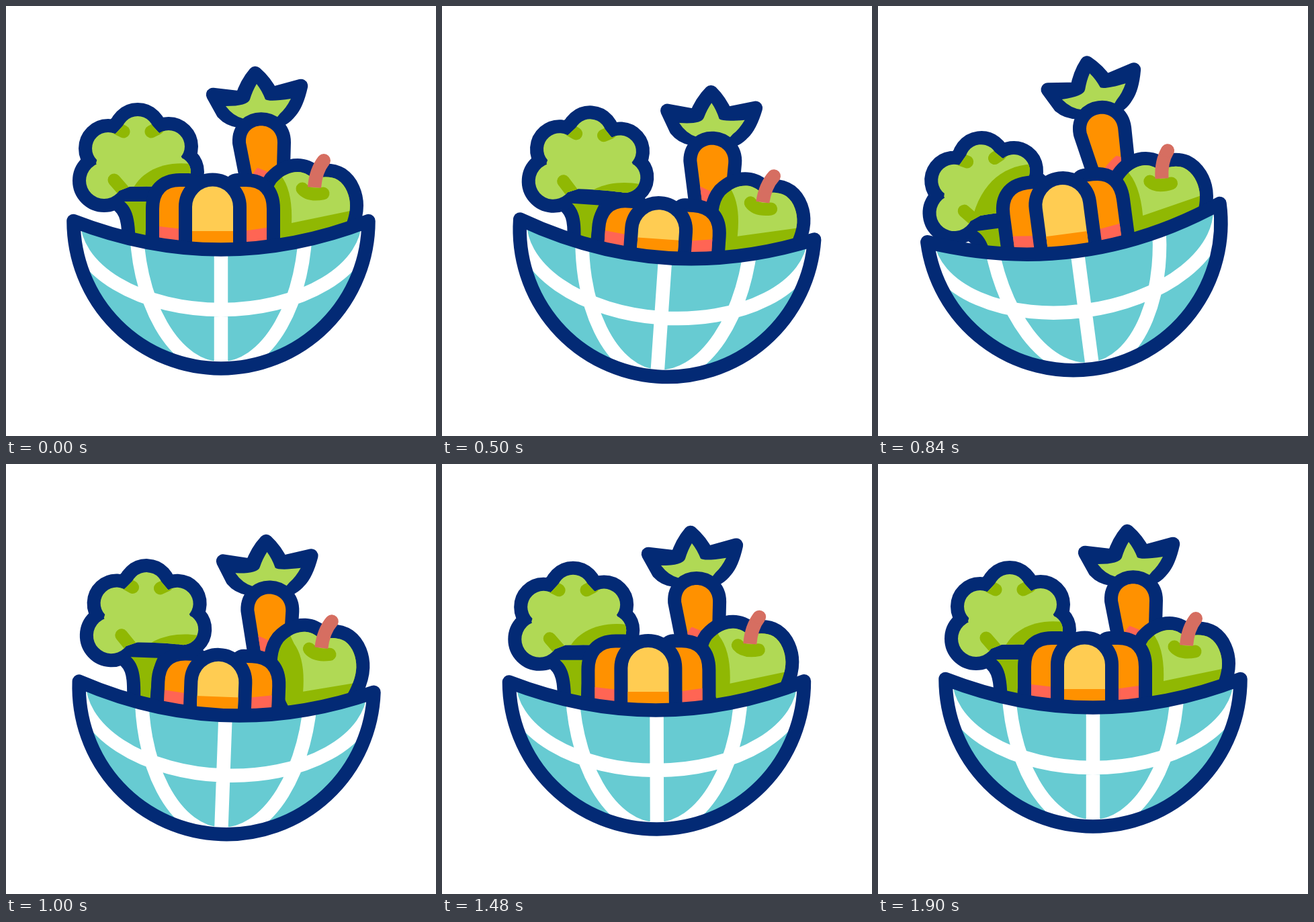
Recreate the animation shown at these times as an HTML page with a canvas. Size 640 by 640 pixels, loop 2.2 s.

```html
<!DOCTYPE html>
<html lang="en">
<head>
<meta charset="utf-8">
<title>Rocking bowl of vegetables</title>
<style>
  html, body { margin: 0; width: 100%; height: 100%; overflow: hidden; background: #fff; }
  canvas { display: block; width: 640px; height: 640px; }
</style>
</head>
<body>
<canvas id="stage" width="640" height="640"></canvas>
<script>
const ctx = document.getElementById('stage').getContext('2d');
const LOOP = 2200, BEAT = 240, LINE = 20.5;
const NAVY = '#032a75', TEAL = '#67cbd2', LIGHT = '#b0d955', DARK = '#90b803',
      ORANGE = '#ff9100', YELLOW = '#ffcc52', RED = '#ff6554', STEM = '#d66e61';

// Cosine-eased swing through values one beat apart.
function swing(t, start, values) {
  const p = (t - start) / BEAT;
  if (p <= 0) return values[0];
  const i = Math.floor(p);
  if (i >= values.length - 1) return values[values.length - 1];
  const k = (1 - Math.cos(Math.PI * (p - i))) / 2;
  return values[i] + (values[i + 1] - values[i]) * k;
}

function fill(path, color) {
  ctx.fillStyle = color;
  ctx.fill(path);
}

function stroke(path, color, width, cap = 'round') {
  ctx.strokeStyle = color;
  ctx.lineWidth = width;
  ctx.lineCap = cap;
  ctx.lineJoin = 'round';
  ctx.stroke(path);
}

// Navy border lying outside the shape.
function border(path) {
  fill(path, NAVY);
  stroke(path, NAVY, LINE * 2 - 1);
}

function inside(path, draw) {
  ctx.save();
  ctx.clip(path);
  draw();
  ctx.restore();
}

function shifted(dx, dy, draw) {
  ctx.save();
  ctx.translate(dx, dy);
  draw();
  ctx.restore();
}

const bowl = new Path2D('M100.5 320 A219.5 219.5 0 0 0 539.5 320 Q320 405 100.5 320 Z');
const grid = new Path2D();
grid.moveTo(320, 330);
grid.lineTo(320, 545);
grid.moveTo(539.5, 320);
grid.ellipse(320, 320, 219.5, 132, 0, 0, Math.PI);
grid.moveTo(446, 320);
grid.ellipse(320, 320, 126, 219.5, 0, 0, Math.PI);

const crown = new Path2D('M308 132 L351 137 Q358 115 371 100 Q386 113 395 131 L439 119 ' +
  'Q433 146 423 157 Q413 170 400 171 L347 171 Q332 169 323 159 Z');
const leaves = new Path2D('M327 149 Q360 149 363 139 Q367 126 373 116 Q381 126 386 139 ' +
  'Q392 143 424 138 Q417 152 408 160 L400 170 L354 168 Q338 164 327 149 Z');
const carrot = new Path2D('M357 203 C355 170 404 170 404 203 L403 240 L400 300 L376 300 Z');

const canopy = new Path2D('M134 234 L140 212 L165 188 L176 176 L216 176 L227 188 L250 205 L263 228 ' +
  'L265 262 Q254 271 236 269 Q208 268 184 269 L171 274 L155 280 Z');
for (const [x, y, r] of [[146, 260, 27], [152, 212, 24], [196, 188, 24], [242, 209, 24], [252, 247, 23]]) {
  const lobe = new Path2D();
  lobe.arc(x, y, r, 0, Math.PI * 2);
  canopy.addPath(lobe);
}
const trunk = new Path2D('M176 291 L216 291 C209 305 207 330 207 385 L193 385 C193 330 193 306 176 291 Z');
const dimples = new Path2D('M165 182 L175 187 M226 182 L216 187 M161 259 L175 275');

const apple = new Path2D('M402 263 C412 252 423 247 434 247 C446 247 452 254 459 257 ' +
  'C470 254 484 253 494 259 C506 267 512 283 512 297 C512 320 498 345 480 368 L420 368 ' +
  'C400 345 384 288 402 263 Z');
const sheen = new Path2D('M395 225 L409 252 Q427 275 425 323 L532 301 L532 225 Z');
const dent = new Path2D('M441 272 Q450 283 472 279');
const stalk = new Path2D('M459 270 Q461 245 473 230');
const stalkTip = new Path2D('M473 230 l.01 -.01');

const middle = new Path2D('M277 420 L277 299 A30.5 30.5 0 0 1 338 299 L338 420 Z');
const sides = [
  new Path2D('M228 420 L228 302 Q228 269 259 269 L272 269 L272 420 Z'),
  new Path2D('M388 420 L388 302 Q388 269 357 269 L344 269 L344 420 Z')
];
const sideShade = new Path2D('M220 327 L270 333 L346 336 L396 329 L396 450 L220 450 Z');
const middleShade = new Path2D('M270 335 L345 335 L345 450 L270 450 Z');

function drawCarrot(s) {
  fill(crown, NAVY);
  stroke(crown, NAVY, LINE);
  fill(leaves, LIGHT);
  border(carrot);
  fill(carrot, ORANGE);
  // The red tip lies below two edges that move against each other.
  const a = 235 - 5 * s, b = 215 + 16 * s;
  const slope = new Path2D(`M350 ${a - 4} L410 ${a + 20} L410 320 L350 320 Z`);
  const arc = new Path2D(`M355 ${b + 57} Q372 ${b + 17} 408 ${b} L408 320 L355 320 Z`);
  inside(carrot, () => inside(slope, () => fill(arc, RED)));
}

function drawBroccoli(s) {
  border(trunk);
  border(canopy);
  fill(trunk, DARK);
  fill(canopy, LIGHT);
  const y = 24 * s;
  const shade = new Path2D(`M${187 - 13 * s} 276 C${199 - 5 * s} ${247 - y} ` +
    `235 ${228 - y} 282 ${236 - y} L290 295 L187 295 Z`);
  inside(canopy, () => {
    fill(shade, DARK);
    stroke(dimples, DARK, 19);
  });
}

// Shades of the apple and pumpkin stay level with the bowl while the fruit slides.
function drawApple(slide) {
  border(apple);
  fill(apple, DARK);
  inside(apple, () => {
    shifted(-0.7 * slide, -slide, () => fill(sheen, LIGHT));
    stroke(dent, DARK, 19);
  });
  stroke(stalk, STEM, 20, 'butt');
  stroke(stalkTip, STEM, 20);
}

function drawPumpkin(slide) {
  const segment = (path, color, shade, shadeColor) => {
    fill(path, color);
    inside(path, () => shifted(0, -slide, () => fill(shade, shadeColor)));
  };
  for (const side of sides) border(side);
  for (const side of sides) segment(side, ORANGE, sideShade, RED);
  border(middle);
  segment(middle, YELLOW, middleShade, ORANGE);
}

function drawBowl() {
  fill(bowl, TEAL);
  inside(bowl, () => stroke(grid, '#fff', LINE, 'butt'));
  stroke(bowl, NAVY, LINE);
}

function draw(t) {
  const roll = swing(t, 380, [0, 30, -30, 30, -15.5, 8, 0]);
  const dip = swing(t, 260, [0, 12.5, -3, 12, -5, 4, 0]);
  const shade = swing(t, 320, [0, -1, 1.5, -1, 0.7, -0.2, 0]);
  const carrotY = swing(t, 380, [0, 23, -14, 10, -3.5, -1, 0]);
  const broccoliY = swing(t, 560, [0, 25, -12.5, 10.5, -4.5, 0]);
  const appleY = swing(t, 500, [0, 11, -13.5, 10, -6, 0]);
  const pumpkinY = swing(t, 260, [0, 23, -20, 14.5, -5.5, 0.5, 0]);

  ctx.setTransform(1, 0, 0, 1, 0, 0);
  ctx.fillStyle = '#fff';
  ctx.fillRect(0, 0, 640, 640);

  ctx.translate(320 + roll, 320 + dip);
  ctx.rotate(roll / 222);
  ctx.translate(-320, -320);

  shifted(0, carrotY, () => drawCarrot(shade));
  shifted(0, broccoliY, () => drawBroccoli(shade));
  shifted(0, appleY, () => drawApple(appleY));
  shifted(0, pumpkinY, () => drawPumpkin(pumpkinY));
  drawBowl();
}

const begin = performance.now();
function tick() {
  draw((performance.now() - begin) % LOOP);
  requestAnimationFrame(tick);
}
tick();
</script>
</body>
</html>
```
